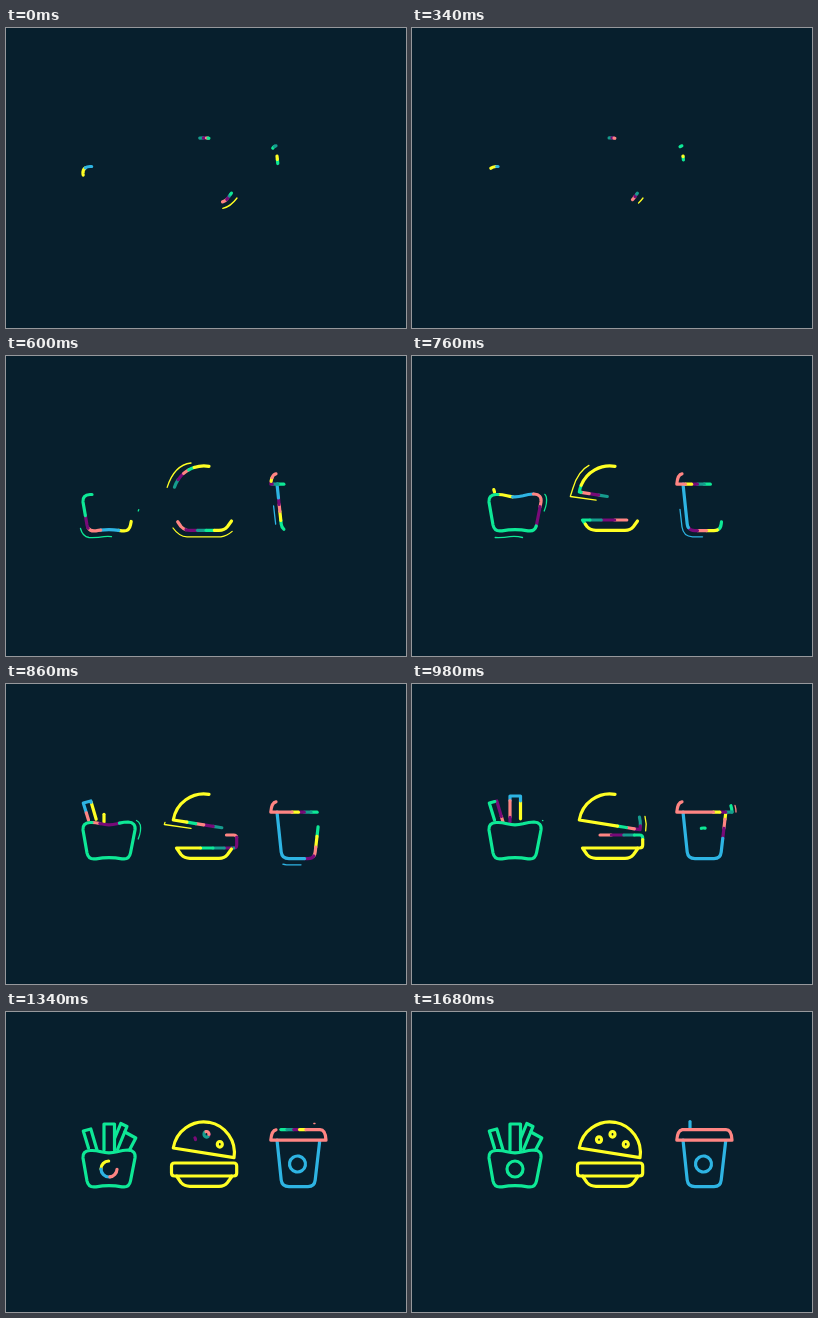
Write an HTML page with a canvas that moves like this. It is 400 px wide and 300 px high and loops after 2200 ms.

```html
<!DOCTYPE html>
<html lang="en">
<head>
<meta charset="utf-8">
<title>Food icons</title>
<style>
html, body { margin: 0; width: 100%; height: 100%; overflow: hidden; background: #071f2d; }
canvas { display: block; width: 400px; height: 300px; }
</style>
</head>
<body>
<canvas id="stage"></canvas>
<script>
const LOOP = 2200, END = 1680, TURN = 190, RAMP = 400;
const BG = '#071f2d';
const green = '#0ee896', yellow = '#ffff24', blue = '#2eb4e3';
const pink = '#ff8583', purple = '#780a78', teal = '#169c8e';

// Colour order runs from the leading layer to the final one.
const FRIES = [yellow, blue, pink, purple, green];
const BUN = [teal, purple, pink, green, yellow];
const PLATE = [pink, purple, teal, green, yellow];
const SEED = [purple, teal, pink, green, yellow];
const LID = [green, teal, purple, yellow, pink];
const CUP = [green, yellow, pink, purple, blue];
const LAGS = [0, 42, 88, 127, 170];

const canvas = document.getElementById('stage');
const ctx = canvas.getContext('2d');
const scale = window.devicePixelRatio || 1;
canvas.width = 400 * scale;
canvas.height = 300 * scale;

const line = (d, colors, start, speed, stretch = 1) =>
  ({ path: new Path2D(d), colors, start, speed, stretch });

const ring = (x, y, rx, ry, from, ccw) => {
  const path = new Path2D();
  path.ellipse(x, y, rx, ry, 0, from, from + (ccw ? -2 : 2) * Math.PI, ccw);
  return path;
};

const loop = (path, colors, start, speed) =>
  ({ path, colors, start, speed, stretch: 1 });

const accent = (d, color, start, speed, tailStart, tailSpeed) =>
  ({ path: new Path2D(d), color, start, speed, tailStart, tailSpeed });

const lines = [
  // fries
  line('M82.5 136 L77.3 119 L84.8 117 L91 138', FRIES, 365, 0.42),
  line('M98 138 V112 H108.5 V138', FRIES, 453, 0.43),
  line('M108.8 126 L114.8 111.5 L121 114.5 L111.5 137.5', FRIES, 592, 0.43),
  line('M118.8 120 L129.8 126 L123.5 138', FRIES, 670, 0.43),
  line('M86 138.5 H84 Q76.3 139 77 146 L81 169 Q82.5 176 90 174.8 ' +
    'Q103 172.6 116 174.8 Q123 176 124.5 169 L129 146 Q130 138.5 122 138 ' +
    'Q117 138 111 139.8 Q103 142 95 139.8 Q90 138.5 86 138.5', FRIES, 12, 0.455),
  loop(ring(103, 157, 8, 8, 0, false), FRIES, 823, 0.29),
  // burger
  line('M203 110.3 A31 31 0 0 0 167.3 136 L228 145.7 A31 31 0 0 0 203 110.3', BUN, 0, 0.208),
  line('M225.5 164 H227.7 Q230.7 164 230.7 161 V154 Q230.7 151 227.7 151 H168.5 ' +
    'Q165.5 151 165.5 154 V161 Q165.5 164 168.5 164 H171', PLATE, 375, 0.27),
  line('M225.5 165 L221.5 170.5 Q218.5 174.3 213 174.3 H184 ' +
    'Q178.5 174.3 175 170.5 L170.5 164 H225.5', PLATE, 0, 0.29),
  loop(ring(213.8, 132.3, 2.5, 2.8, 0, true), SEED, 690, 0.2),
  loop(ring(200.5, 122.3, 2.5, 2.8, 0, true), SEED, 840, 0.2),
  loop(ring(187, 127.6, 2.5, 2.8, 0, true), SEED, 942, 0.2),
  // drink
  line('M278 117 V109.5', CUP, 1020, 0.08),
  line('M271 128 L275.2 168 Q276 174.6 283 174.6 H302 Q308.5 174.6 309.2 168 L313.7 129', CUP, 12, 0.232),
  loop(ring(291.5, 152, 8, 8, -Math.PI / 2 + 0.2, true), CUP, 578, 0.29),
  line('M270 117.8 Q265.5 118.5 264.8 128.2 H320 Q319.5 117.6 314 117.6 H270', LID, 12, 0.128, 1.15)
];

const accents = [
  accent('M74.5 172.5 Q76.5 180.5 83 181.5 Q91 181.8 98 180.6 Q105 180 110.5 181.5', green, 140, 0.5, 338, 0.4),
  accent('M132.2 155 Q135.5 147 134.3 141 Q133 137.5 130.5 136.5', green, 198, 0.1, 480, 0.18),
  accent('M185 107 Q168 109 161 132 L158.3 140.5 L185 144.3', yellow, 48, 0.222, 347, 0.35),
  accent('M231 170 Q224 179.5 215 180.8 H181 Q173 180.5 167 172', yellow, 19, 0.7, 195, 0.45),
  accent('M233.6 147 Q235 140 233 132.5', yellow, 515, 0.2, 590, 0.2),
  accent('M267.6 150 L270 171 Q271.5 180.6 280.5 180.8 H295', blue, 110, 0.18, 360, 0.3),
  accent('M324 128 Q324 122 321 117', pink, 540, 0.13, 600, 0.13),
  accent('M309 111.5 H284', pink, 942, 0.13, 1040, 0.13)
];

// Slow start, then constant speed.
function warp(x) {
  const d = Math.max(0, x - TURN);
  return d < RAMP ? d * d / (2 * RAMP) : d - RAMP / 2;
}

function trace(path, from, to, color, width) {
  if (to - from < 0.4) return;
  ctx.strokeStyle = color;
  ctx.lineWidth = width;
  ctx.setLineDash([to - from, 9999]);
  ctx.lineDashOffset = -from;
  ctx.stroke(path);
}

function draw(t) {
  // The strokes first draw back, then run forward.
  const u = t < TURN ? 2 * TURN - t : Math.min(t, END);
  ctx.setTransform(scale, 0, 0, scale, 0, 0);
  ctx.fillStyle = BG;
  ctx.fillRect(0, 0, 400, 300);
  ctx.lineCap = ctx.lineJoin = 'round';

  for (const s of lines) {
    const heads = LAGS.map(lag => s.speed * (warp(u - lag * s.stretch) - s.start));
    s.colors.forEach((color, i) => {
      const tail = Math.max(0, heads[i + 1] || 0);
      trace(s.path, tail, heads[i], color, 3.2);
    });
  }
  const c = warp(u);
  for (const a of accents) {
    const tail = Math.max(0, a.tailSpeed * (c - a.tailStart));
    trace(a.path, tail, a.speed * (c - a.start), a.color, 1.3);
  }
}

const began = performance.now();
function tick() {
  draw((performance.now() - began) % LOOP);
  requestAnimationFrame(tick);
}
tick();
</script>
</body>
</html>
```
